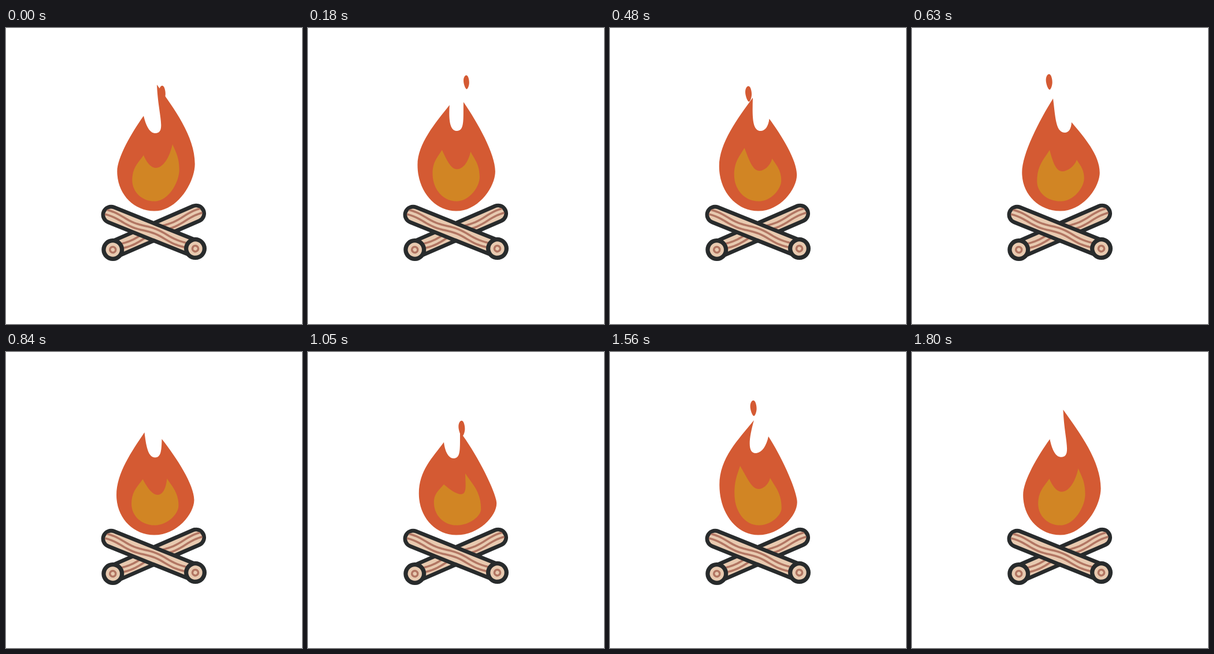
These frames come from a looping animation (512 by 512 pixels, 1.83 s). An HTML page:

```html
<!DOCTYPE html>
<html lang="en">
<head>
<meta charset="utf-8">
<title>Campfire</title>
<style>
  html, body { margin: 0; width: 100%; height: 100%; overflow: hidden; background: #fff; }
  svg { display: block; width: 100vw; height: 100vh; }
  .bark { fill: none; stroke: #282b2c; stroke-linecap: round; }
  .wood { fill: none; stroke: #e8cab0; stroke-linecap: round; }
  .grain { fill: none; stroke: #b27663; stroke-width: 3.6; }
</style>
</head>
<body>
<svg viewBox="0 0 512 512">
  <defs>
    <clipPath id="inside"><rect x="-167.5" y="-10.5" width="178" height="21" rx="9"/></clipPath>
    <g id="log">
      <path class="bark" stroke-width="34.5" d="M-157 0H0"/>
      <path class="wood" stroke-width="21" d="M-157 0H0"/>
      <g id="grains" clip-path="url(#inside)"></g>
      <circle r="19.5" fill="#282b2c"/>
      <circle r="12.2" fill="#e8cab0"/>
      <circle class="grain" r="5"/>
    </g>
  </defs>
  <use href="#log" transform="translate(184.8 383.5) rotate(-23.5) scale(-1 1)"/>
  <use href="#log" transform="translate(327.5 381.6) rotate(21.9)"/>
  <g id="sparks" fill="#d45a33"></g>
  <path id="outer" fill="#d45a33"/>
  <path id="inner" fill="#d18524"/>
</svg>
<script>
const LOOP = 1830, STEP = 30;
const CENTRE = 257, HALF_WIDTH = 67.2;
const $ = id => document.getElementById(id);

// outer, inner: left tip, valley, right tip
// body: sway, height of left and right side, roundness of the left side
const poses = [
  { at: 0, outer: [238, 152, 258, 182, 261, 98], inner: [238, 220, 259, 242, 288, 201], body: [259.5, 248, 235, .25] },
  { at: 330, outer: [250, 119, 257, 175, 275, 151], inner: [227, 204, 257, 246, 276, 224], body: [254.5, 228, 258, .42] },
  { at: 630, outer: [244, 122, 264, 181, 276, 163], inner: [238, 211, 260, 248, 285, 228], body: [257.5, 250, 250, .25] },
  { at: 1050, outer: [235, 156, 252, 184, 263, 138], inner: [235, 229, 264, 246, 272, 210], body: [259, 245, 262, .45] },
  { at: 1350, outer: [251, 119, 265, 181, 281, 160], inner: [234, 200, 254, 240, 280, 222], body: [253.2, 245, 250, .25] },
  { at: 1560, outer: [249, 118, 252, 175, 274, 146], inner: [225, 197, 257, 237, 277, 218], body: [256.5, 230, 260, .42] }
];
poses.push({ ...poses[0], at: LOOP });

const sparks = [
  { start: 1815, life: 350, from: [270, 115], to: [277, 77] },
  { start: 450, life: 380, from: [240, 118], to: [234, 66] },
  { start: 1010, life: 300, from: [265.5, 138], to: [268, 95] },
  { start: 1400, life: 380, from: [247, 120], to: [249.5, 66] }
];

const mix = (a, b, p) => a + (b - a) * p;
const ease = p => p * p * (3 - 2 * p);

function poseAt(t) {
  const i = poses.findIndex((pose, k) => t >= pose.at && t < poses[k + 1].at);
  const a = poses[i], b = poses[i + 1];
  const p = ease((t - a.at) / (b.at - a.at));
  const blend = key => a[key].map((v, k) => mix(v, b[key][k], p));
  return { outer: blend('outer'), inner: blend('inner'), body: blend('body') };
}

const curve = (...p) => 'C' + p.map(v => v.toFixed(2)).join(' ');

function flamePath([lx, ly, vx, vy, rx, ry], left, right, bottom) {
  const [ax, ay] = left, [bx, by] = right;
  const pull = h => 4 + .19 * Math.abs(h);
  // control points from a side up to its tip
  const rise = (x, y, tx, ty, round) =>
    [x, mix(y, ty, round), mix(tx, x, .45), mix(ty, y, .3)];
  const [a1x, a1y, a2x, a2y] = rise(ax, ay, lx, ly, left[2]);
  return `M${lx} ${ly}` +
    curve(a2x, a2y, a1x, a1y, ax, ay) +
    curve(ax, mix(ay, bottom, .57), mix(CENTRE, ax, .56), bottom, CENTRE, bottom) +
    curve(mix(CENTRE, bx, .56), bottom, bx, mix(by, bottom, .4), bx, by) +
    curve(...rise(bx, by, rx, ry, right[2]), rx, ry) +
    curve(mix(rx, vx, .3) + 3, mix(ry, vy, .62), vx + pull(vy - ry), vy, vx, vy) +
    curve(vx - pull(vy - ly), vy, lx + .75 * (vx - lx) - 11, mix(ly, vy, .55), lx, ly) + 'Z';
}

function addPath(parent, d, className) {
  const path = document.createElementNS('http://www.w3.org/2000/svg', 'path');
  path.setAttribute('d', d);
  if (className) path.setAttribute('class', className);
  return parent.appendChild(path);
}

for (const offset of [-4, 4.2]) {
  let d = '';
  for (let x = -170; x <= 0; x += 5) {
    const y = offset - 2 * Math.cos((x + 75) / 80 * 2 * Math.PI);
    d += (d ? 'L' : 'M') + x + ' ' + y.toFixed(2);
  }
  addPath($('grains'), d, 'grain');
}

const sparkShape = 'M0-13.5C4-13.5 6-3 5.5 2C5 9 2 13.5 1 13.5C-2 13.5-5.5 3-5.5-3C-5.5-9-3-13.5 0-13.5Z';
for (const spark of sparks) spark.node = addPath($('sparks'), sparkShape);

function draw(t) {
  const { outer, inner, body: [sway, leftY, rightY, round] } = poseAt(t);
  const l = sway - HALF_WIDTH, r = sway + HALF_WIDTH;
  $('outer').setAttribute('d',
    flamePath(outer, [l, leftY, round], [r, rightY, .6 - round], 316.6));
  $('inner').setAttribute('d',
    flamePath(inner, [l + 26, leftY + 15, .5], [r - 27, rightY + 10, .5], 299.7));
  for (const { start, life, from, to, node } of sparks) {
    const p = (t - start + LOOP) % LOOP / life;
    const size = p < 1 ? Math.min(1, 2 * (1 - p)) : 0;
    const x = mix(from[0], to[0], p), y = mix(from[1], to[1], p);
    node.setAttribute('visibility', size ? 'visible' : 'hidden');
    node.setAttribute('transform', `translate(${x} ${y}) scale(${size})`);
  }
}

const began = performance.now();
function tick() {
  const elapsed = performance.now() - began;
  draw(Math.floor(elapsed / STEP) * STEP % LOOP);
  requestAnimationFrame(tick);
}
tick();
</script>
</body>
</html>
```
